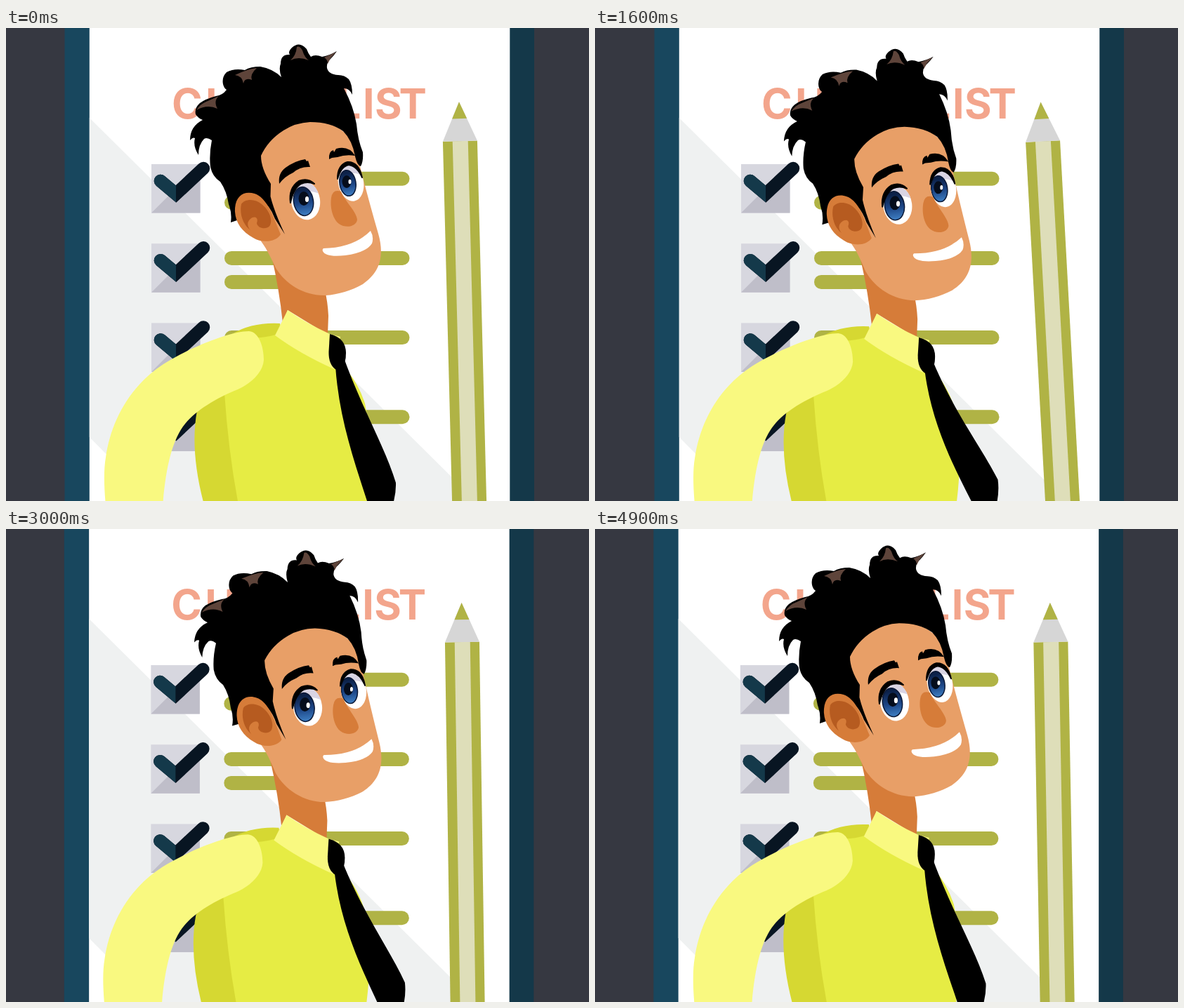
An HTML page that plays this animation: 830x674 px, repeating every 5 s.

```html
<!DOCTYPE html>
<html lang="en">
<head>
<meta charset="utf-8">
<title>Checklist</title>
<style>
  html, body { margin: 0; width: 100%; height: 100%; overflow: hidden; background: #363841; }
  svg { display: block; width: 100vw; height: 100vh; }
  .title { font: 700 59px Inter, "Open Sans", sans-serif; fill: #f3a58c; }
  .olive { fill: #b0b345; }
  .pale { fill: #f9f980; }
  .skin { fill: #e89f67; }
  .shade { fill: #d67c39; }
  .brown { fill: #5e443a; }
</style>
</head>
<body>
<svg viewBox="0 0 830 674" preserveAspectRatio="none">
  <defs>
    <clipPath id="half"><rect x="200" y="180" width="42" height="90"/></clipPath>
    <linearGradient id="iris" x1="0" y1="0" x2="0" y2="1">
      <stop offset=".1" stop-color="#0c2148"/>
      <stop offset=".55" stop-color="#1c4484"/>
      <stop offset="1" stop-color="#3f80c4"/>
    </linearGradient>
    <clipPath id="eyeL"><ellipse cx="426.500" cy="246" rx="20.500" ry="27.500" transform="rotate(-9 426.500 246)"/></clipPath>
    <clipPath id="eyeR"><ellipse cx="491" cy="220" rx="18" ry="27" transform="rotate(-11 491 220)"/></clipPath>
    <g id="row">
      <rect x="207" y="194" width="69.500" height="69.500" fill="#d7d7df"/>
      <path d="M207 263.500L276.500 194V263.500Z" fill="#bfbec9"/>
      <g fill="none" stroke-width="18.500" stroke-linecap="round">
        <path d="M220 218L242 236.500L281 200" stroke="#081522"/>
        <path d="M220 218L242 236.500L281 200" stroke="#14394a" clip-path="url(#half)"/>
      </g>
      <rect class="olive" x="311" y="204.700" width="263.500" height="20" rx="10"/>
      <rect class="olive" x="311" y="238.700" width="118" height="20" rx="10"/>
    </g>
  </defs>

  <g id="scene">
    <rect x="83.500" y="-5" width="40" height="690" fill="#18475e"/>
    <rect x="710" y="-5" width="42" height="690" fill="#143849"/>
    <rect x="118.800" y="-5" width="598.500" height="690" fill="#fff"/>
    <path d="M118.800 128L680 685H220L118.800 583Z" fill="#eff1f1"/>
    <text class="title" y="128.500" x="236 284 336 374 421 472 508 525 559.500">CHECKLIST</text>
    <use href="#row"/>
    <use href="#row" y="113.200"/>
    <use href="#row" y="226.400"/>
    <use href="#row" y="339.600"/>

    <g id="pencil">
      <path class="olive" d="M630.700 161H679.700V720H630.700Z"/>
      <path d="M644.500 161H666.500V720H644.500Z" fill="#dedeb9"/>
      <path d="M655.200 105L679.700 161H630.700Z" fill="#d6d6d6"/>
      <path class="olive" d="M655.200 105L665.700 129H644.700Z"/>
    </g>

    <g id="man">
      <g id="body">
        <path d="M322 436Q350 419 390 421L400 470L345 700H288Q260 610 272 545L300 500Z" fill="#d6d832"/>
        <path d="M350 441Q368 442 384 437L470 470Q500 500 511 535Q526 604 512 690L333 690Q317 610 311 520Z" fill="#e6ec44"/>
      </g>
      <g id="collar">
        <path class="shade" d="M378 325Q389 372 394 420L401 402L458 437L459 410Q458 390 454 374L440 350Z"/>
        <path class="pale" d="M401 402Q428 421 461 436L476 440L467 486Q418 464 383 438Z"/>
        <path id="tie"/>
        <path d="M461 436Q484 442 484 463Q484 477 478 486L470 487Q459 480 459.500 461Z"/>
      </g>
      <g id="arm">
        <path class="pale" d="M144 700Q137 640 142 612C149 562 175 511 224 479C262 455 320 432 346 432C360 433 367 454 367 473C366 490 350 506 330 515C300 527 270 545 255 564C235 588 225 636 222 700Z"/>
      </g>

      <g id="head">
        <path class="skin" d="M360 180Q375 142 430 131Q484 133 499 175C507 212 520 258 530 293C540 328 530 350 508 365C492 374 473 380 455 381C425 382 398 365 384 342C376 325 370 312 360 300L368 220Z"/>
        <path d="M397 294Q382 262 376.500 240L377 222Q363 200 363 182Q373 160 395 146Q412 135 433 134Q462 134 480 147Q493 160 497 183Q500 196 505 197Q509 190 508 177Q501 160 499 137Q495 112 481 86Q489 86 493 95Q493 80 488 73Q482 67 473 67Q459 66 457 57Q456 49 463 43Q467 39 471 33Q461 39 450 41Q440 37 434 41Q430 36 428 30Q418 18 407 28Q401 34 404 38Q391 37 391 51Q388 58 392 70Q380 58 362 55Q348 55 340 60Q325 57 314 63Q307 70 309 80Q310 85 314 88Q308 96 299 97Q284 101 276 107Q268 114 270 123Q273 128 280 131Q262 140 262 160Q266 155 269 157Q266 168 274 181Q274 166 282 158Q286 155 293 160Q289 180 291 198Q294 212 305 219Q314 232 317 251Q322 264 320 277L332 273L345 235Q372 242 383 272Z"/>
        <path class="brown" d="M271 117Q277 108 285 105Q294 101 303 97Q295 104 301 115Q287 108 271 117Z"/>
        <path class="brown" d="M326 67Q345 58 357 57Q347 66 350 74Q340 70 338 79Q336 68 326 67Z"/>
        <path class="brown" d="M405 46Q413 39 414 27Q418 25 422 32Q425 42 431 46Q416 40 405 46Z"/>
        <path class="brown" d="M457 40L470 34L462 43L458 51Q458 45 453 42Z"/>

        <path class="shade" d="M326 262C325 240 338 231 354 236C372 242 380 268 391 294C385 305 365 307 352 299C336 290 327 278 326 262Z"/>
        <path d="M335 251C340 243 355 243 364 251C374 259 380 272 376 281C372 288 358 286 357 278C360 270 354 267 348 272C342 277 344 284 348 288C338 281 332 266 335 251Z" fill="#b65b20"/>

        <path d="M389 222Q387 207 398 199Q412 189 426 187L428 190L430 189L433 198Q419 197 409 206Q396 212 389 222Z"/>
        <path d="M460 187Q459 176 466 174L467 177L470 172Q488 167 497 182Q483 180 472 184L464 185Z"/>

        <g clip-path="url(#eyeL)">
          <rect x="400" y="210" width="55" height="70" fill="#fff"/>
          <path d="M400 210H450V238Q428 226 402 240Z" fill="#d9d4e3"/>
          <g class="gaze">
            <ellipse cx="423.500" cy="247" rx="14" ry="20.500" fill="url(#iris)" stroke="#0a1836" stroke-width="1.500" transform="rotate(-9 423.500 247)"/>
            <ellipse cx="424" cy="243" rx="7.500" ry="10" fill="#050d1c"/>
            <ellipse cx="428.500" cy="244" rx="2.600" ry="4" fill="#fff"/>
          </g>
        </g>
        <path d="M405 249Q402 228 417 218Q430 213 439 222Q429 218 420 222Q409 229 405 249Z" stroke="#000" stroke-width="2" stroke-linejoin="round"/>
        <g clip-path="url(#eyeR)">
          <rect x="468" y="188" width="50" height="64" fill="#fff"/>
          <path d="M468 188H515V214Q494 200 468 213Z" fill="#d9d4e3"/>
          <g class="gaze">
            <ellipse cx="486.500" cy="221" rx="11.500" ry="18.500" fill="url(#iris)" stroke="#0a1836" stroke-width="1.500" transform="rotate(-9 486.500 221)"/>
            <ellipse cx="485" cy="219" rx="6.500" ry="9" fill="#050d1c"/>
            <ellipse cx="489.500" cy="219" rx="2" ry="3.300" fill="#fff"/>
          </g>
        </g>
        <path d="M472 215Q472 195 486 191Q502 190 507 213Q500 197 488 195Q477 197 472 215Z" stroke="#000" stroke-width="2" stroke-linejoin="round"/>

        <path class="shade" d="M463 242Q465 229 477 233C482 246 499 262 500 273C499 283 484 286 474 279C465 272 461 256 463 242Z"/>
        <path d="M452 314Q495 313 519 289Q524 298 521 307Q513 320 483 324Q455 327 451 318Q450 315 452 314Z" fill="#fff"/>
      </g>
    </g>
  </g>
</svg>

<script>
  const LOOP = 5000, STEP = 100;
  const times = [0, 800, 1600, 2600, 3400, 4200, 4900];
  const nod = [0, .48, .85, 1, .82, .37, .02];
  const swing = [0, -4, -5.9, -5.5, -3.5, -1.5, -.5];
  const tilt = [-1.47, -3.05, -3.12, -1.61, -.17, .46, -1.04];
  const tieShape = [
    [469, 482], [474, 555], [495, 615], [514, 674], [523, 706], [540, 706],
    [556, 674], [555, 648], [540, 598], [508, 545], [481, 470]
  ];

  const el = id => document.getElementById(id);
  const put = (id, value) => el(id).setAttribute("transform", value);
  const gazes = document.querySelectorAll(".gaze");

  // Key at any index, wrapped around the loop
  function key(track, i) {
    const n = times.length, turn = Math.floor(i / n), j = i - turn * n;
    return { t: times[j] + turn * LOOP, v: track[j] };
  }

  // Smooth cyclic curve through the keys
  function curve(track, t) {
    let i = times.length - 1;
    while (times[i] > t) i--;
    const [a, b, c, d] = [-1, 0, 1, 2].map(k => key(track, i + k));
    const span = c.t - b.t, u = (t - b.t) / span;
    const m0 = (c.v - a.v) / (c.t - a.t) * span;
    const m1 = (d.v - b.v) / (d.t - b.t) * span;
    const u2 = u * u, u3 = u2 * u;
    return (2 * u3 - 3 * u2 + 1) * b.v + (u3 - 2 * u2 + u) * m0
         + (3 * u2 - 2 * u3) * c.v + (u3 - u2) * m1;
  }

  // The tie bends: points turn further the lower they hang
  function tiePath(deg) {
    const p = tieShape.map(([x, y]) => {
      const dx = x - 472, dy = y - 465;
      const a = deg * Math.PI / 180 * Math.min(1, Math.hypot(dx, dy) / 200);
      const c = Math.cos(a), s = Math.sin(a);
      return `${472 + dx * c - dy * s} ${465 + dx * s + dy * c}`;
    });
    return `M${p[0]}C${p.slice(1, 4).join(" ")}L${p[4]}L${p[5]}`
         + `Q${p[6]} ${p[7]}C${p.slice(8).join(" ")}Z`;
  }

  function draw(t) {
    const k = curve(nod, t);
    put("scene", `translate(${1.1 * Math.sin(t / LOOP * 2 * Math.PI)} 0)`);
    put("pencil", `rotate(${curve(tilt, t)} 655.2 503)`);
    put("man", `translate(${-k} 0)`);
    put("body", `translate(0 ${5 * k})`);
    put("collar", `translate(0 ${5.8 * k})`);
    put("arm", `translate(0 ${9.8 * k}) scale(1 ${1 - .0145 * k})`);
    put("head", `translate(0 ${8.3 * k}) rotate(${2.05 * k} 450 381)`);
    el("tie").setAttribute("d", tiePath(curve(swing, t)));
    gazes.forEach(g => g.setAttribute("transform", `translate(${-1.5 * k} 0)`));
  }

  const start = performance.now();
  function tick() {
    const t = (performance.now() - start) % LOOP;
    draw(Math.floor(t / STEP) * STEP);
    requestAnimationFrame(tick);
  }
  draw(0);
  requestAnimationFrame(tick);
</script>
</body>
</html>
```
